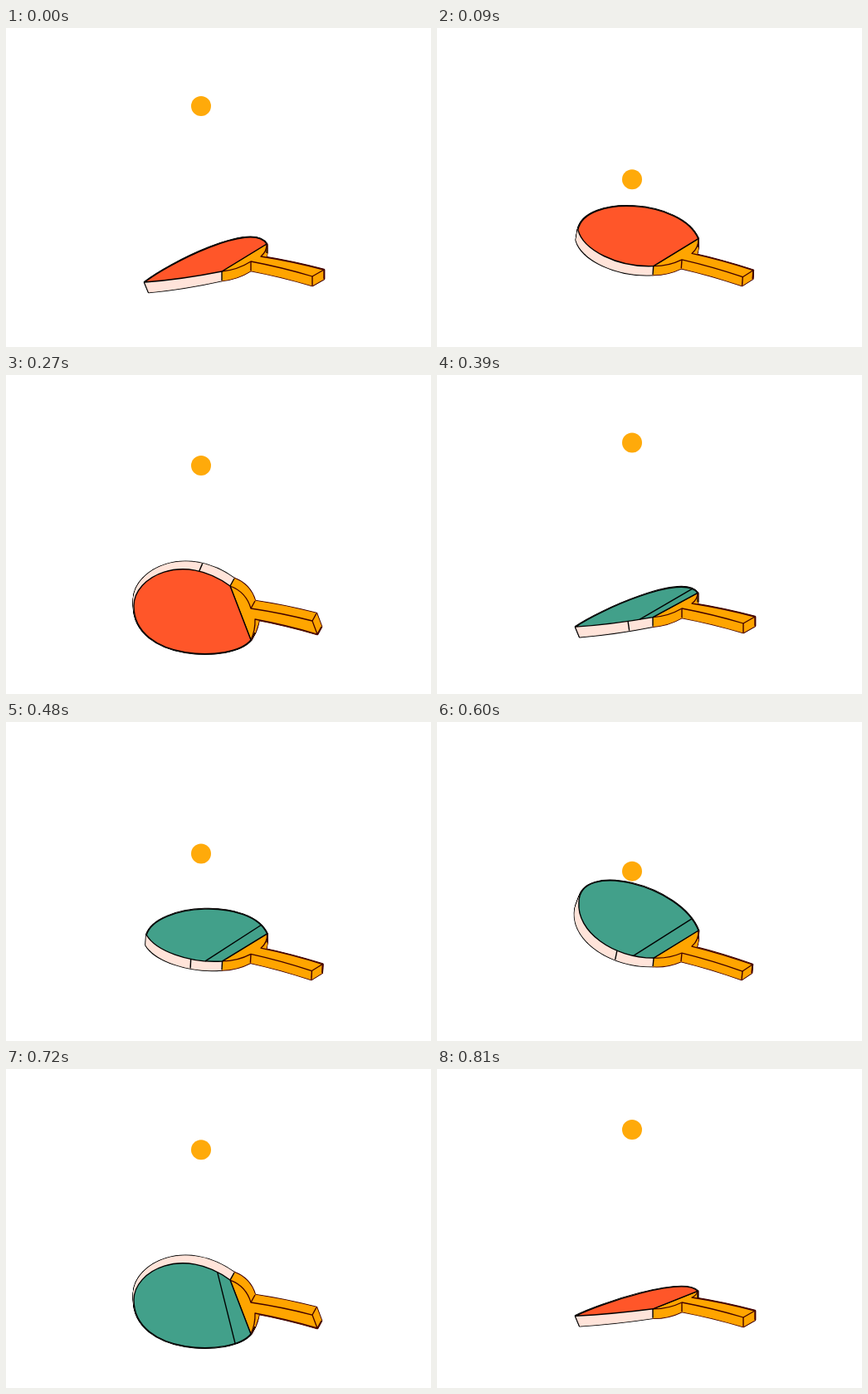
An HTML page with a canvas that plays this animation: 512x384 px, repeating every 840 ms.

```html
<!DOCTYPE html>
<html lang="en">
<head>
<meta charset="utf-8">
<title>Table tennis bat</title>
<style>
html, body { margin: 0; width: 100%; height: 100%; overflow: hidden; background: #fff; }
canvas { display: block; }
</style>
</head>
<body>
<canvas id="stage" width="512" height="384"></canvas>
<script>
const ctx = document.getElementById('stage').getContext('2d');
const LOOP = 840, STEP = 30, LEAD = 30, RED_TIME = 405;
const ORANGE = '#ffa500', RED = '#ff5629', GREEN = '#42a08a', EDGE = '#ffe4da';
const INK = '#000', WOOD_INK = '#400000';

const mix = (a, b, k) => a + (b - a) * k;
const mixPoint = (p, q, k) => [mix(p[0], q[0], k), mix(p[1], q[1], k)];
const mixPoints = (a, b, k) => a.map((p, i) => mixPoint(p, b[i], k));
const easeOut = k => Math.sin(k * Math.PI / 2);

// A pose: rim from near end over the tip to far end, four handle corners,
// then the thickness vectors at the tip and at the handle.
const pose = (rim, grip, depth) => [...rim, ...grip, ...depth];
const thin = pose(
  [[260,293], [230,299], [195,304], [167,306], [195,284], [297,232], [314,260]],
  [[307,275], [383,291], [369,299], [295,281]], [[5,12], [0,11]]);
const open = pose(
  [[261,284], [212,284], [168,252], [171,217], [171,166], [294,196], [315,251]],
  [[307,270], [380,292], [368,300], [295,278]], [[-5,13], [-1,10]]);
const facing = pose(
  [[295,319], [272,347], [154,344], [154,278], [154,243], [213,212], [270,254]],
  [[295,281], [369,296], [375,312], [300,294]], [[0,-9], [5,-9]]);
const flat = thin.map(([x, y], i) => i < 7 ? [x, mix(281, y, .65)] : [x, y]);
const edgeOn = turnOver(flat);

// Pose reached at each share of a half turn
const halfTurn = [[0, flat], [.074, thin], [.517, open], [.74, facing],
  [.793, facing], [.96, edgeOn], [1.01, edgeOn]];

function backOf(front) {
  const [tip, base] = front.slice(11);
  return front.slice(0, 11).map(([x, y], i) => {
    const nearTip = Math.max(0, 1 - Math.abs(i - 3) / 3);
    const [dx, dy] = mixPoint(base, tip, nearTip);
    return [x + dx, y + dy];
  });
}

// Only the near edge stays in sight; the handle swaps its near and far sides
function turnOver(front) {
  const back = backOf(front), near = back.slice(0, 4);
  const depth = front.slice(11).map(([x, y]) => [-x, -y]);
  return pose([...near, ...near.slice(0, 3).reverse()], back.slice(7).reverse(), depth);
}

function poseAt(u) {
  const i = halfTurn.findIndex(key => key[0] > u);
  const [u0, from] = halfTurn[i - 1], [u1, to] = halfTurn[i];
  return mixPoints(from, to, easeOut((u - u0) / (u1 - u0)));
}

function ballHeight(u) {
  const hit = .4;
  return 73 + 156 * (u < hit ? (u / hit) ** 1.19 : ((1 - u) / (1 - hit)) ** 1.75);
}

function bezier(points, k) {
  while (points.length > 1)
    points = points.slice(1).map((p, i) => mixPoint(points[i], p, k));
  return points[0];
}

function bladePath(q) {
  ctx.beginPath();
  ctx.moveTo(...q[0]);
  ctx.bezierCurveTo(...q[1], ...q[2], ...q[3]);
  ctx.bezierCurveTo(...q[4], ...q[5], ...q[6]);
  ctx.closePath();
}

function curveTo(from, to, bulge, lift = 0) {
  const [x, y] = mixPoint(from, to, .5);
  ctx.quadraticCurveTo(x + (to[1] - from[1]) * bulge, y + (from[0] - to[0]) * bulge - lift, ...to);
}

function gripPath(q) {
  const [baseFar, endFar, endNear, baseNear] = q.slice(7, 11);
  ctx.beginPath();
  ctx.moveTo(...q[6]);
  curveTo(q[6], baseFar, .25);
  curveTo(baseFar, endFar, 0, 2);
  ctx.lineTo(...endNear);
  curveTo(endNear, baseNear, 0, 2);
  curveTo(baseNear, q[0], .12);
  ctx.closePath();
}

function stroke(color, width) {
  ctx.strokeStyle = color;
  ctx.lineWidth = width;
  ctx.stroke();
}

function fill(color) {
  ctx.fillStyle = color;
  ctx.fill();
}

function line(a, b, color) {
  ctx.beginPath();
  ctx.moveTo(...a);
  ctx.lineTo(...b);
  stroke(color, 1.4);
}

function drawBat(shape, green) {
  const front = shape.slice(0, 11), back = backOf(shape);
  const sweep = (path, color, width) => {
    for (let k = 1; k >= 0; k -= 1 / 16) {
      path(mixPoints(front, back, k));
      fill(color);
      stroke(color, width);
    }
  };
  sweep(bladePath, INK, 2.6);
  sweep(gripPath, WOOD_INK, 2.6);
  sweep(bladePath, EDGE, .8);
  sweep(gripPath, ORANGE, .8);

  const nearRim = q => q.slice(0, 4), farRim = q => q.slice(3, 7);
  const [rim, seam] = green ? [nearRim, .32] : [farRim, .78];
  line(bezier(rim(front), seam), bezier(rim(back), seam), INK);
  const neck = shape[12][1] > 0 ? 10 : 7;
  for (const i of [0, 6]) line(front[i], back[i], INK);
  for (const i of [neck, 8, 9]) line(front[i], back[i], WOOD_INK);

  gripPath(front);
  fill(ORANGE);
  stroke(WOOD_INK, 1.3);
  bladePath(front);
  fill(green ? GREEN : RED);
  stroke(INK, 1.4);
  if (green) line(bezier(nearRim(front), .17), bezier(farRim(front), .91), INK);
}

function frame(now) {
  const t = (Math.floor(now / STEP) * STEP + LEAD) % LOOP;
  const green = t >= RED_TIME;
  const u = green ? (t - RED_TIME) / (LOOP - RED_TIME) : t / RED_TIME;
  ctx.fillStyle = '#fff';
  ctx.fillRect(0, 0, 512, 384);
  ctx.lineJoin = 'round';
  drawBat(poseAt(u), green);
  ctx.beginPath();
  ctx.arc(235, ballHeight(u), 12, 0, Math.PI * 2);
  fill('#ffaa0a');
  requestAnimationFrame(frame);
}
requestAnimationFrame(frame);
</script>
</body>
</html>
```
